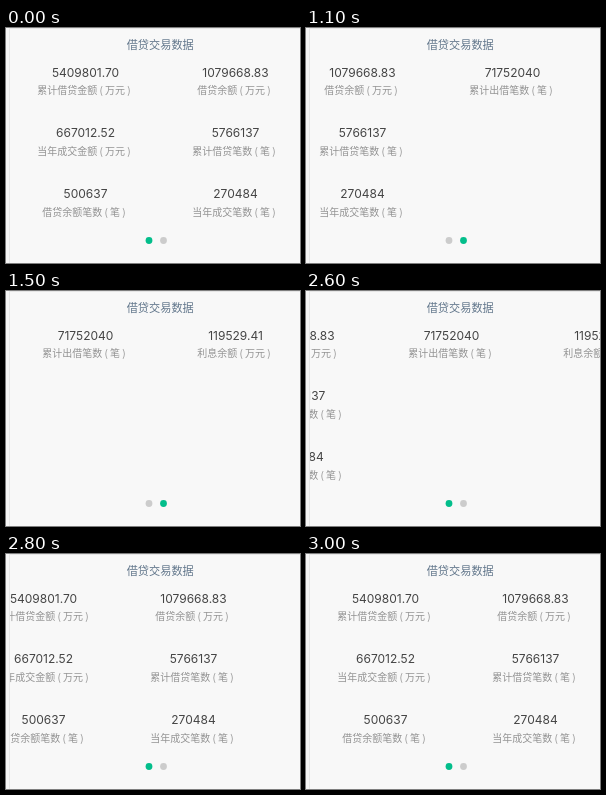
These frames come from a looping animation (294 px wide and 235 px high, 4900 ms). An HTML page with a canvas:

```html
<!DOCTYPE html>
<html lang="zh-CN">
<head>
<meta charset="utf-8">
<style>
  html, body { margin: 0; width: 294px; height: 235px; overflow: hidden; background: #f8f8f8; }
  canvas { display: block; }
</style>
</head>
<body>
<canvas id="stage" width="294" height="235"></canvas>
<script>
const ctx = document.getElementById('stage').getContext('2d');
const LOOP = 4900, TICK = 100, SLIDE = 500, PAGE = 300;
const FORWARD = 1000, BACK = 2600;
const CJK = '"Noto Sans CJK SC", "Noto Sans CJK", sans-serif';

// Each column holds [value, label] pairs from top to bottom.
// Spaced parentheses sit in the middle of their cell.
const columns = [
  [['5409801.70', '累计借贷金额 ( 万元 ) '], ['667012.52', '当年成交金额 ( 万元 ) '], ['500637', '借贷余额笔数 ( 笔 ) ']],
  [['1079668.83', '借贷余额 ( 万元 ) '], ['5766137', '累计借贷笔数 ( 笔 ) '], ['270484', '当年成交笔数 ( 笔 ) ']],
  [['71752040', '累计出借笔数 ( 笔 ) ']],
  [['119529.41', '利息余额 ( 万元 ) ']]
];
const valueY = [49, 109, 170];
const labelY = [66, 127, 188];

// CSS "ease": cubic-bezier(.25, .1, .25, 1)
function ease(x) {
  if (x <= 0) return 0;
  if (x >= 1) return 1;
  const bezier = (a, b, s) => 3 * a * s * (1 - s) ** 2 + 3 * b * s * s * (1 - s) + s ** 3;
  let low = 0, high = 1;
  for (let i = 0; i < 24; i++) {
    const mid = (low + high) / 2;
    if (bezier(0.25, 0.25, mid) < x) low = mid; else high = mid;
  }
  return bezier(0.1, 1, low);
}

function scrollAt(t) {
  if (t <= FORWARD) return 0;
  if (t < BACK) return Math.round(PAGE * ease((t - FORWARD + 67) / SLIDE));
  return Math.round(PAGE * (1 - ease((t - BACK + 83.5) / SLIDE)));
}

function text(str, x, y, font, color) {
  ctx.font = font;
  ctx.fillStyle = color;
  ctx.fillText(str, x, y);
}

function dot(x, active) {
  ctx.fillStyle = active ? '#03be8b' : '#cccccc';
  ctx.beginPath();
  ctx.arc(x, 212.5, 3.4, 0, Math.PI * 2);
  ctx.fill();
}

function draw(t) {
  ctx.fillStyle = '#f8f8f8';
  ctx.fillRect(0, 0, 294, 235);
  ctx.fillStyle = '#f5f5f5';
  ctx.fillRect(0, 0, 3, 235);
  ctx.fillStyle = '#e6e6e6';
  ctx.fillRect(3, 0, 1, 235);
  ctx.fillRect(3, 0, 291, 1);

  ctx.textAlign = 'center';
  text('借贷交易数据', 154.2, 21, '11.2px ' + CJK, '#60758a');

  ctx.save();
  ctx.beginPath();
  ctx.rect(4, 30, 290, 170);
  ctx.clip();
  const scroll = scrollAt(t);
  columns.forEach((cells, col) => {
    const x = 79 + col * 150 - scroll;
    cells.forEach(([value, label], row) => {
      text(value, x + 0.5, valueY[row], '12px Inter, sans-serif', '#444444');
      text(label, x, labelY[row], '10px ' + CJK, '#929292');
    });
  });
  ctx.restore();

  const second = t >= FORWARD && t < BACK;
  dot(143, !second);
  dot(157.5, second);
}

const start = performance.now();
function frame() {
  const t = (performance.now() - start) % LOOP;
  draw(Math.floor(t / TICK) * TICK);
  requestAnimationFrame(frame);
}
frame();
</script>
</body>
</html>
```
